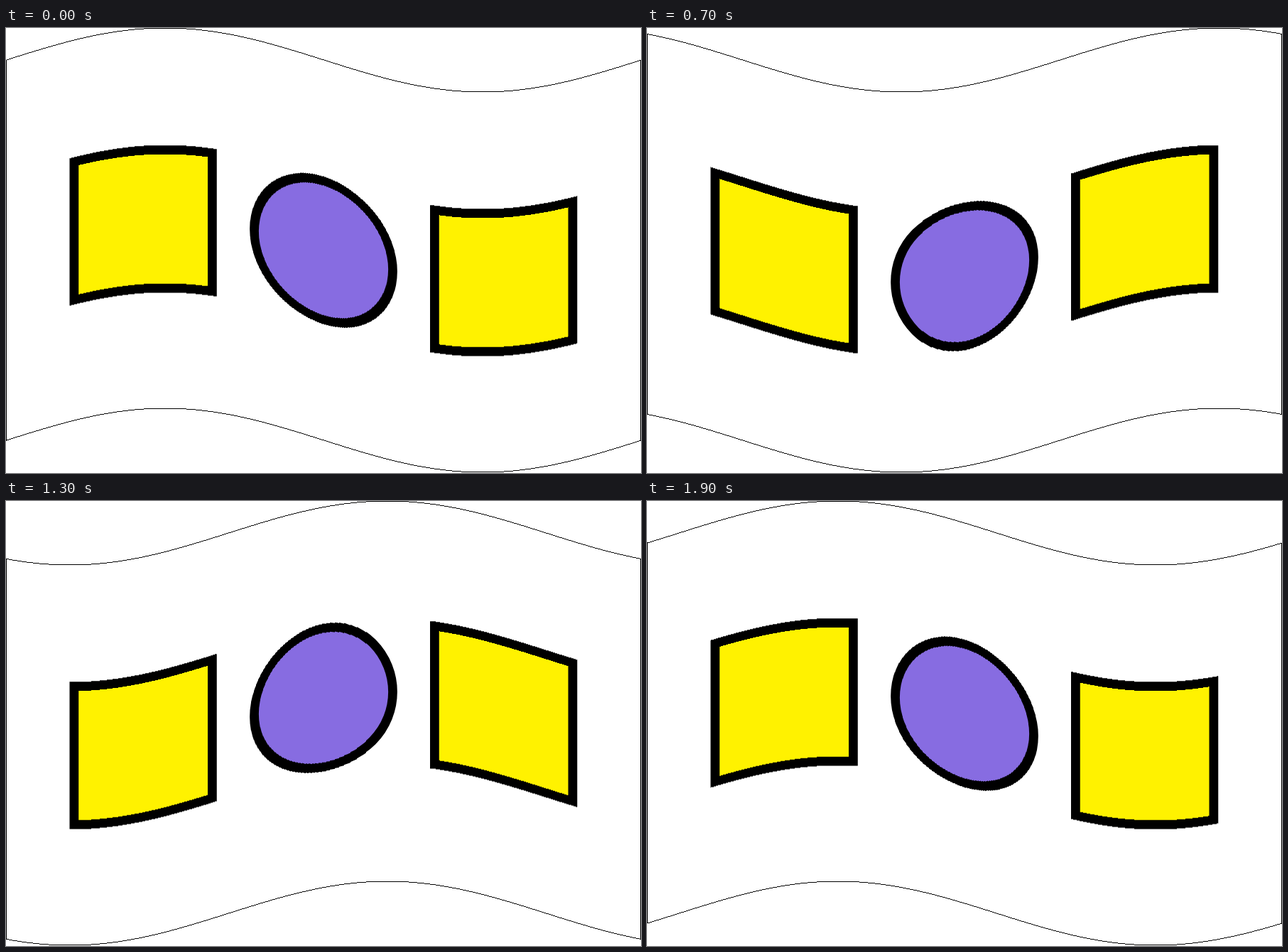
An HTML page with a canvas for the animation above (2 s loop, 894x626 px).

```html
<!DOCTYPE html>
<html lang="en">
<head>
<meta charset="utf-8">
<title>Waving flag</title>
<style>
  html, body { margin: 0; height: 100%; overflow: hidden; background: #fff; }
  canvas { display: block; }
</style>
</head>
<body>
<canvas id="stage" width="894" height="626"></canvas>
<script>
const WIDTH = 894, HEIGHT = 626, SWING = 45;
const FLAG_HEIGHT = HEIGHT - 2 * SWING;
const STEPS = 20, STEP_MS = 100;
const ctx = document.getElementById('stage').getContext('2d');

function drawFlatFlag() {
  const flag = document.createElement('canvas');
  flag.width = WIDTH;
  flag.height = FLAG_HEIGHT;
  const g = flag.getContext('2d');
  g.fillStyle = '#fff';
  g.fillRect(0, 0, WIDTH, FLAG_HEIGHT);
  g.strokeStyle = '#000';
  g.strokeRect(0.5, 0.5, WIDTH - 1, FLAG_HEIGHT - 1);

  g.lineWidth = 12.75;
  const paint = (color, addShape) => {
    g.beginPath();
    addShape();
    g.fillStyle = color;
    g.fill();
    g.stroke();
  };
  for (const x of [95.875, 603.375]) {
    paint('#fff200', () => g.rect(x, 171.5, 194.5, 194.5));
  }
  paint('#876ce1', () => g.arc(447, 268.5, 97.5, 0, 2 * Math.PI));
  return flag;
}

const flag = drawFlatFlag();
let shownStep = -1;

// Shift every pixel column down by a travelling sine wave.
function drawWave(step) {
  ctx.fillStyle = '#fff';
  ctx.fillRect(0, 0, WIDTH, HEIGHT);
  for (let x = 0; x < WIDTH; x++) {
    const phase = 2 * Math.PI * (x / WIDTH + step / STEPS);
    const y = Math.floor(SWING * (1 - Math.sin(phase)));
    ctx.drawImage(flag, x, 0, 1, FLAG_HEIGHT, x, y, 1, FLAG_HEIGHT);
  }
}

function tick() {
  const step = Math.floor(performance.now() / STEP_MS) % STEPS;
  if (step !== shownStep) drawWave(shownStep = step);
  requestAnimationFrame(tick);
}
tick();
</script>
</body>
</html>
```
